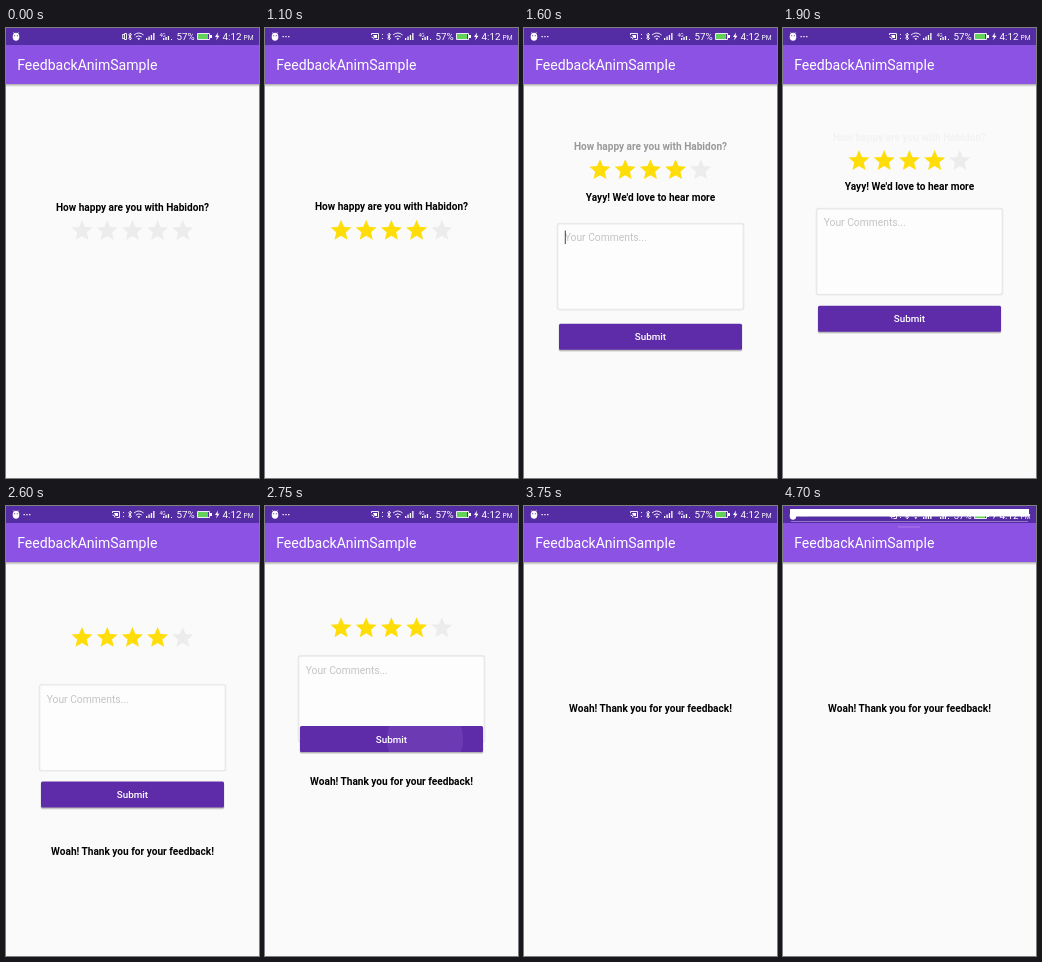
Animation, 253 px wide and 450 px high, one loop 4750 ms. Source, as an HTML page:

```html
<!DOCTYPE html>
<html lang="en">
<head>
<meta charset="utf-8">
<title>Feedback animation</title>
<style>
  html, body { margin: 0; width: 100%; height: 100%; overflow: hidden; background: #fafafa; }
  svg { display: block; width: 100%; height: 100%; font-family: Roboto, sans-serif; }
  .bold { font-size: 10.1px; font-weight: 700; text-anchor: middle; }
  .line { fill: none; stroke: #fff; stroke-width: .9; }
</style>
</head>
<body>
<svg viewBox="0 0 253 450">
  <defs>
    <path id="star" d="M12 17.27L18.18 21l-1.64-7.03L22 9.24l-7.19-.61L12 2 9.19 8.63 2 9.24l5.46 4.73L5.82 21z"/>
    <linearGradient id="barShadow" x2="0" y2="1">
      <stop stop-color="#000" stop-opacity=".32"/>
      <stop offset="1" stop-color="#000" stop-opacity="0"/>
    </linearGradient>
    <clipPath id="buttonClip"><rect x="35" width="183" height="26" rx="1.5"/></clipPath>
  </defs>
  <rect width="253" height="450" fill="#fafafa"/>

  <text id="question" class="bold" x="126.5" y="3.5">How happy are you with Habidon?</text>
  <g id="stars"></g>
  <text id="praise" class="bold" x="126.5" y="3.5">Yayy! We'd love to hear more</text>
  <g id="comments">
    <rect x="33.5" y=".5" width="186" height="86" rx="2" fill="#fdfdfd" stroke="#e9e9e9" stroke-width="1.7"/>
    <text x="40.7" y="18.3" font-size="10.3" fill="#c4c4c4">Your Comments...</text>
    <rect id="cursor" x="40.8" y="7.5" width="1" height="13.5" fill="#444"/>
  </g>
  <g id="submit">
    <rect x="34.5" y="1" width="184" height="27" rx="2" fill="#000" opacity=".13"/>
    <rect x="35" y=".5" width="183" height="26.5" rx="1.5" fill="#000" opacity=".18"/>
    <rect x="35" width="183" height="26" rx="1.5" fill="#5e2ca9"/>
    <g clip-path="url(#buttonClip)"><circle id="ripple" cx="160" cy="13" fill="#c9a0ff"/></g>
    <text x="126.5" y="16.5" font-size="9.84" font-weight="500" fill="#fff" text-anchor="middle">Submit</text>
  </g>
  <text id="thanks" class="bold" x="126.5" y="3.5">Woah! Thank you for your feedback!</text>

  <rect y="56" width="253" height="3" fill="url(#barShadow)"/>
  <rect y="17" width="253" height="39" fill="#8c52e4"/>
  <rect width="253" height="17" fill="#542ca3"/>
  <text x="11.2" y="42" font-size="14.06" fill="#fff">FeedbackAnimSample</text>

  <g id="status" fill="#fff">
    <path d="M7 8a3 3 0 0 1 6 0v1.500a3 3 0 0 1-6 0zM7.300 4l1.500 2M12.700 4l-1.500 2" stroke="#fff" stroke-width=".5"/>
    <path d="M8.200 7.200h1v1h-1zM10.800 7.200h1v1h-1z" fill="#542ca3"/>
    <g id="notices">
      <path d="M17.500 8h1.300v1.300h-1.300zM20.300 8h1.300v1.300h-1.300zM23.100 8h1.300v1.300h-1.300z"/>
      <path class="line" d="M106.500 7V5.500h7v6h-3M106.500 9a2.500 2.500 0 0 1 2.500 2.500"/>
      <path d="M108 7h4v3h-2.500z"/>
    </g>
    <path id="vibrate" class="line" d="M116.700 6v5M118.500 5.500h2v6h-2z"/>
    <path class="line" d="M117.500 6v1M117.500 10v1M122.500 6.500l3 4-1.500 1.500V5l1.500 1.500-3 4"/>
    <path class="line" d="M128 7q4.800-4 9.600 0M129.800 9q3-2.400 6 0"/>
    <path d="M131.300 10.300h3l-1.500 2z"/>
    <path d="M140 10h1.300v2H140zM142.400 8.500h1.300V12h-1.300zM144.800 7h1.300v5h-1.300zM147.200 5h1.300v7h-1.300z"/>
    <text x="153.500" y="8.600" font-size="5">4G</text>
    <path d="M157 10h1.300v2H157zM159.400 9h1.300v3h-1.300zM161.800 8h1.300v4h-1.300zM165 11h1v1h-1z"/>
    <text x="170.500" y="12" font-size="9.800">57%</text>
    <path class="line" d="M191.500 5.500h12v6h-12z"/>
    <path d="M204 7h2v3h-2z"/>
    <path d="M192 6h10v5h-10z" fill="#63d259"/>
    <path d="M212 4.500l-3 4.500h2l-1 3.500 3.500-4.700h-2z"/>
    <text x="216.500" y="12" font-size="9.800">4:12</text>
    <text x="237.500" y="12" font-size="6.700">PM</text>
  </g>
  <g id="shade">
    <rect x="7" y="3" width="239" height="7.500" fill="#fff"/>
    <path d="M8 15.500h237" stroke="#a98bd6" stroke-width=".8"/>
    <path d="M115 21h22" stroke="#b08cec" stroke-width=".8"/>
  </g>
</svg>
<script>
const LOOP = 4750, RATED = 1100, SENT = 2600;
const $ = id => document.getElementById(id);
const progress = (t, start, length) => Math.min(1, Math.max(0, (t - start) / length));
const easeOut = x => 1 - (1 - x) ** 3;
const fadeOut = x => (1 - x) ** 2;

$('stars').innerHTML = [0, 1, 2, 3, 4].map(i =>
  `<use href="#star" transform="translate(${63.4 + i * 25.2} -12.1) scale(1.05)"/>`).join('');
const stars = [...$('stars').children];

function place(id, y, opacity) {
  const el = $(id);
  el.setAttribute('transform', `translate(0 ${y.toFixed(2)})`);
  el.setAttribute('opacity', opacity);
  el.setAttribute('visibility', opacity > 0 ? 'visible' : 'hidden');
}
const show = (id, on) => $(id).setAttribute('visibility', on ? 'inherit' : 'hidden');

function draw(t) {
  const expand = easeOut(progress(t, RATED, 1050));
  const collapse = easeOut(progress(t, SENT, 750));
  const move = (start, open, closed = open) =>
    start + (open - start) * expand + (closed - open) * collapse;
  const appear = progress(t, 1150, 80);
  const leave = fadeOut(progress(t, 2790, 490));

  place('question', move(179, 108.5), fadeOut(progress(t, 1350, 660)));
  place('stars', move(202, 131, 111), leave);
  stars.forEach((star, i) =>
    star.setAttribute('fill', t >= RATED && i < 4 ? '#fedd09' : '#ececec'));
  place('praise', move(244, 157.5), t < SENT ? appear : 0);
  place('comments', move(294.3, 178.5, 119), appear * leave);
  show('cursor', t < 1650 || (t >= 2150 && t < SENT));
  place('submit', move(415, 276, 162), appear * leave);
  $('ripple').setAttribute('r', Math.max(0, (t - SENT) * .253));
  $('ripple').setAttribute('opacity', .12 * (1 - progress(t, 2800, 200)));
  place('thanks', 346 - 144 * collapse, t < SENT ? 0 : 1);

  const pulled = t >= 4695;
  place('status', pulled ? 1 : 0, 1);
  show('notices', t >= 100);
  show('vibrate', t < 100);
  show('shade', pulled);
}

function tick() {
  draw(performance.now() % LOOP);
  requestAnimationFrame(tick);
}
tick();
</script>
</body>
</html>
```
